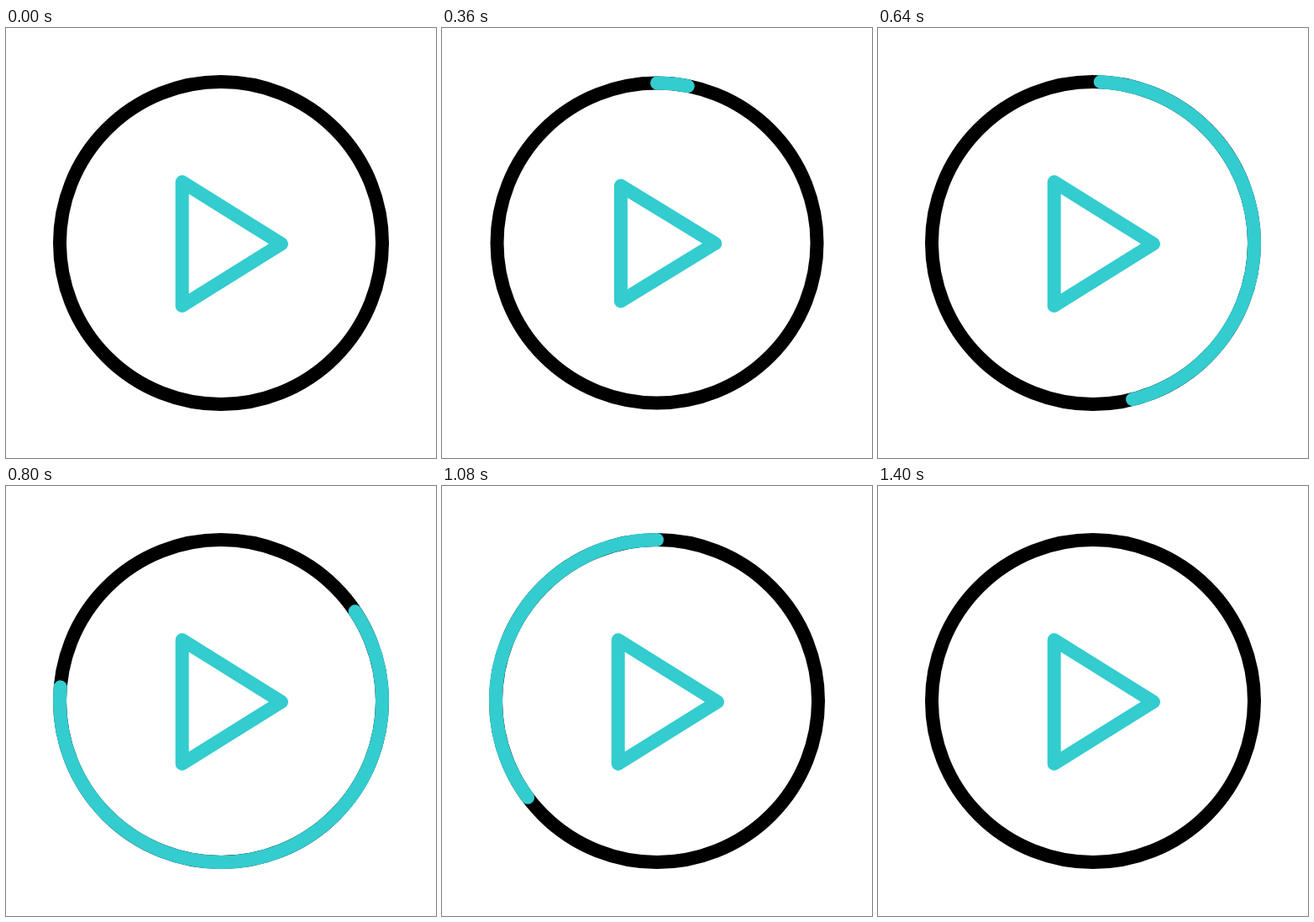
These frames come from a looping animation (512 px wide and 512 px high, 1.48 s). An HTML page:

```html
<!DOCTYPE html>
<html lang="en">
<head>
<meta charset="utf-8">
<title>Play button</title>
<style>
  html, body { margin: 0; width: 100%; height: 100%; overflow: hidden; background: #fff; }
  svg { display: block; width: 100%; height: 100%; }
</style>
</head>
<body>
<svg viewBox="0 0 512 512" fill="none" stroke-width="16" stroke-linecap="round" stroke-linejoin="round">
  <circle id="ring" cx="256" cy="256" r="192" stroke="#000"/>
  <path id="arc" stroke="#33cccf"/>
  <path id="play" stroke="#33cccf"/>
</svg>
<script>
  const LOOP = 1480, STEP = 40, CENTER = 256;
  const ring = document.getElementById('ring');
  const arc = document.getElementById('arc');
  const play = document.getElementById('play');

  // Triangle corners: at rest, and the shift when fully pressed
  const corners = [
    { x: 209.7, y: 183.3, dx: 12.4, dy: 17.5 },
    { x: 328, y: 257, dx: -10.7, dy: -2 },
    { x: 209.7, y: 330.7, dx: 12.4, dy: -21 }
  ];

  // Smooth 0..1 progress between two times
  function ease(t, from, to) {
    const u = Math.min(1, Math.max(0, (t - from) / (to - from)));
    return u * u * (3 - 2 * u);
  }

  function onRing(turn, r) {
    const a = turn * 2 * Math.PI;
    return (CENTER + r * Math.sin(a)).toFixed(3) + ' ' + (CENTER - r * Math.cos(a)).toFixed(3);
  }

  function arcPath(tail, head, r) {
    if (head - tail < 1e-4) return '';
    const large = head - tail > 0.5 ? 1 : 0;
    return `M${onRing(tail, r)}A${r} ${r} 0 ${large} 1 ${onRing(head, r)}`;
  }

  function draw(t) {
    const press = ease(t, 120, 280) - ease(t, 280, 400);
    const r = 192 - 5.8 * press;
    ring.setAttribute('r', r);
    play.setAttribute('d', 'M' + corners.map(c =>
      `${c.x + c.dx * press} ${c.y + c.dy * press}`).join('L') + 'Z');
    arc.setAttribute('d', arcPath(ease(t, 600, 1400), ease(t, 280, 1040), r));
  }

  function tick() {
    const t = performance.now() % LOOP;
    draw(Math.floor(t / STEP) * STEP);
    requestAnimationFrame(tick);
  }

  tick();
</script>
</body>
</html>
```
